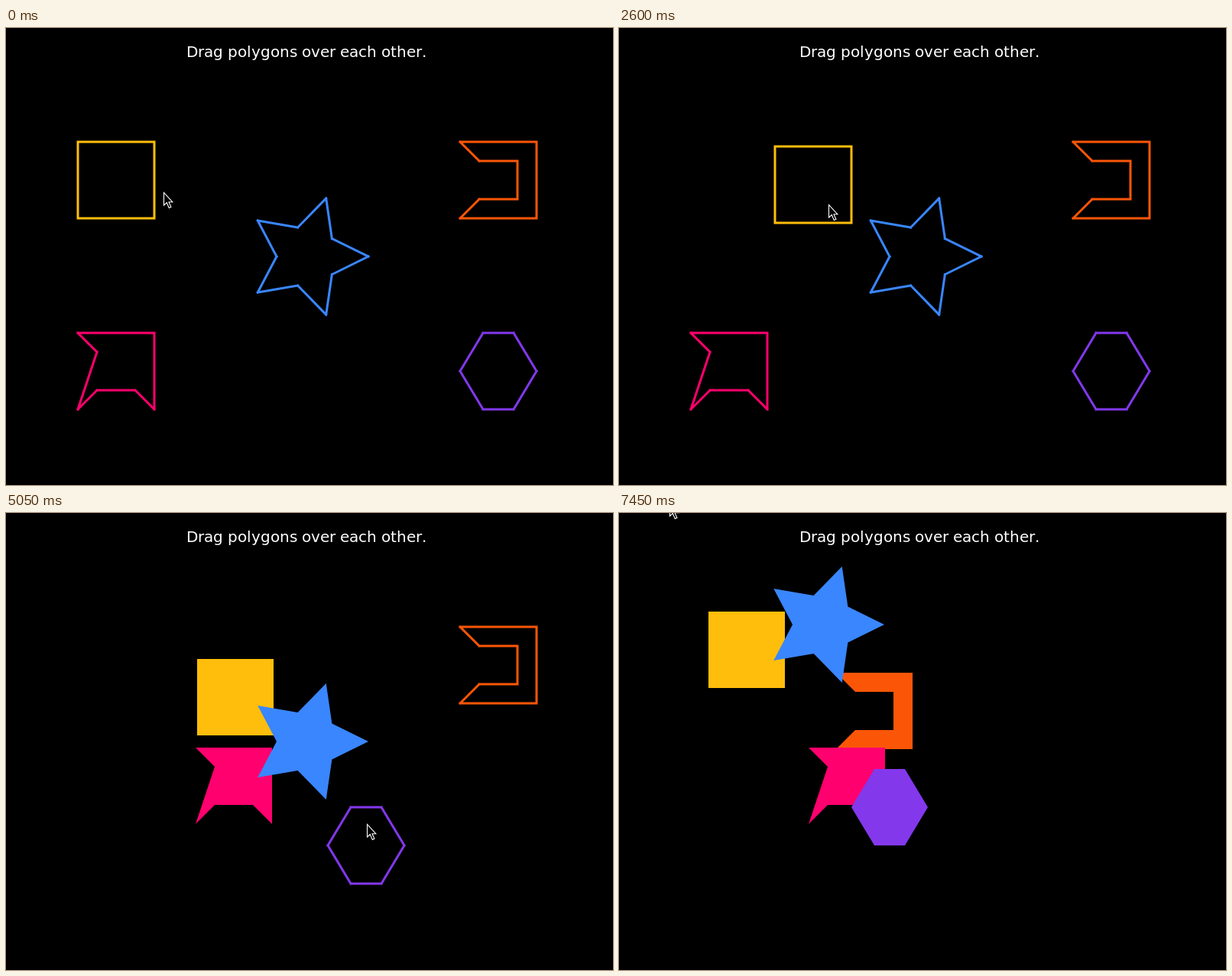
An HTML page with a canvas that plays this animation: 794x598 px, repeating every 7.5 s.

```html
<!DOCTYPE html>
<html lang="en">
<head>
<meta charset="utf-8">
<title>Polygons</title>
<style>
  html, body { margin: 0; width: 100%; height: 100%; overflow: hidden; background: #000; }
  canvas { display: block; }
</style>
</head>
<body>
<canvas id="stage" width="794" height="598"></canvas>
<script>
const ctx = document.getElementById('stage').getContext('2d');
const LOOP = 7500, STEP = 50;
const IDLE_END = 1250, EXIT = { time: 7450, at: [66, -13] };

const clamp = (v, a, b) => Math.min(b, Math.max(a, v));
const ease = u => u * u * (3 - 2 * u);
const add = (p, q) => [p[0] + q[0], p[1] + q[1]];
const mix = (p, q, u) => p.map((v, k) => v + (q[k] - v) * u);
const scale = (pts, n) => pts.map(p => p.map(v => v * n));

const starPoints = Array.from({ length: 10 }, (_, i) => {
  const r = i % 2 ? 40 : 80, a = i * Math.PI / 5;
  return [r * Math.cos(a), r * Math.sin(a)];
});

// Points are around the home position; grip is where the pointer holds the shape
const square = { color: '#ffbe0b', home: [144, 199], grip: [20, 26],
  pts: scale([[-1, -1], [1, -1], [1, 1], [-1, 1]], 50) };
const hook = { color: '#fb5607', home: [644, 199], grip: [23, 36],
  pts: scale([[-2, -2], [2, -2], [2, 2], [-2, 2], [-1, 1], [1, 1], [1, -1], [-1, -1]], 25) };
const flag = { color: '#ff006e', home: [144, 449], grip: [42, -5],
  pts: scale([[-2, -2], [2, -2], [2, 2], [1, 1], [-1, 1], [-2, 2], [-1, -1]], 25) };
const hexagon = { color: '#8338ec', home: [644, 449], grip: [1, -28],
  pts: scale([[-2, -5], [2, -5], [5, 0], [2, 5], [-2, 5], [-5, 0]], 10) };
const star = { color: '#3a86ff', home: [394, 299], grip: [0, 0], pts: starPoints };
const shapes = [square, hook, flag, hexagon, star];

const drag = (shape, start, end, by, bow = 0) => ({ shape, start, end, by, bow });
const drags = [
  drag(square, 1450, 2500, [110, 6], -37),
  drag(square, 2600, 2900, [46, 36]),
  drag(flag, 3500, 3890, [144, 16], 12),
  drag(flag, 3950, 4300, [10, -108]),
  drag(hexagon, 4700, 5000, [-173, -14], 6),
  drag(hexagon, 5050, 5250, [-66, -62]),
  drag(hook, 5480, 5950, [-186, -2]),
  drag(square, 6150, 6350, [-133, -62]),
  drag(star, 6550, 6750, [-127, -153]),
  drag(hexagon, 6850, 6950, [-51, 12]),
  drag(hook, 7100, 7200, [-124, 62])
];

// Eased shift of one drag, bowed vertically
function shift(d, t) {
  const e = ease(clamp((t - d.start) / (d.end - d.start), 0, 1));
  return [d.by[0] * e, d.by[1] * e + d.bow * 4 * e * (1 - e)];
}

const center = (shape, t) => drags
  .filter(d => d.shape === shape)
  .reduce((p, d) => add(p, shift(d, t)), shape.home);

const hold = (d, t) => add(center(d.shape, t), d.shape.grip);

function idle(t) {
  const u = Math.min(t / IDLE_END, 1);
  return [206 + 5 * u - 28 * Math.sin(2 * Math.PI * u), 215 - 2 * u - 8 * Math.sin(Math.PI * u)];
}

function pointer(t) {
  if (t <= IDLE_END) return idle(t);
  const next = drags.findIndex(d => d.start > t);
  const to = drags[next];
  const last = to ? drags[next - 1] : drags[drags.length - 1];
  if (last && t <= last.end) return hold(last, t);

  // Rest for a step, then glide to the next grip or off the stage
  const left = (last ? last.end : IDLE_END) + STEP;
  const from = last ? hold(last, last.end) : idle(IDLE_END);
  const goal = to ? hold(to, to.start) : EXIT.at;
  const due = to ? to.start : EXIT.time;
  return mix(from, goal, ease(clamp((t - left) / (due - left), 0, 1)));
}

// Shapes trail the pointer by one step
function place(shape, t) {
  const c = center(shape, t - STEP).map(Math.round);
  return shape.pts.map(p => add(p, c));
}

const edges = pts => pts.map((p, i) => [p, pts[(i + 1) % pts.length]]);
const side = (a, b, c) => (b[0] - a[0]) * (c[1] - a[1]) - (b[1] - a[1]) * (c[0] - a[0]);
const cross = ([a, b], [c, d]) =>
  side(a, b, c) * side(a, b, d) < 0 && side(c, d, a) * side(c, d, b) < 0;

function inside([x, y], pts) {
  let hit = false;
  for (const [a, b] of edges(pts)) {
    if ((a[1] > y) !== (b[1] > y) &&
        x < a[0] + (b[0] - a[0]) * (y - a[1]) / (b[1] - a[1])) hit = !hit;
  }
  return hit;
}

const overlap = (p, q) =>
  edges(p).some(e => edges(q).some(f => cross(e, f))) || inside(p[0], q) || inside(q[0], p);

function trace(pts) {
  ctx.beginPath();
  pts.forEach(p => ctx.lineTo(...p));
  ctx.closePath();
}

function outline(pts) {
  ctx.lineWidth = 3;
  ctx.lineCap = 'square';
  ctx.beginPath();
  for (const [a, b] of edges(pts)) {
    ctx.moveTo(...a);
    ctx.lineTo(...b);
  }
  ctx.stroke();
}

const arrow = [[0, 0], [0, 16.5], [3.8, 13], [6.8, 20], [9.4, 18.8], [6.5, 12.2], [11.3, 12.2]];

function drawPointer(t) {
  const tip = pointer(t).map(v => Math.round(v) + 0.5);
  trace(arrow.map(p => add(p, tip)));
  ctx.fillStyle = '#000';
  ctx.strokeStyle = '#fff';
  ctx.lineWidth = 1.1;
  ctx.fill();
  ctx.stroke();
}

// Text with whole-pixel advances
function drawText(text, x, y) {
  ctx.fillStyle = '#fff';
  ctx.font = '20px "DejaVu Sans", sans-serif';
  for (const ch of text) {
    ctx.fillText(ch, x, y);
    x += Math.round(ctx.measureText(ch).width);
  }
}

function draw(t) {
  ctx.fillStyle = '#000';
  ctx.fillRect(0, 0, 794, 598);

  const placed = shapes.map(s => place(s, t));
  shapes.forEach((s, i) => {
    const pts = placed[i];
    ctx.fillStyle = ctx.strokeStyle = s.color;
    if (placed.some((q, j) => j !== i && overlap(pts, q))) {
      trace(pts);
      ctx.fill();
    } else {
      outline(pts);
    }
  });

  drawText('Drag polygons over each other.', 236, 38);
  drawPointer(t);
}

const start = performance.now();
function tick() {
  const t = (performance.now() - start) % LOOP;
  draw(Math.floor(t / STEP) * STEP);
  requestAnimationFrame(tick);
}
tick();
</script>
</body>
</html>
```
